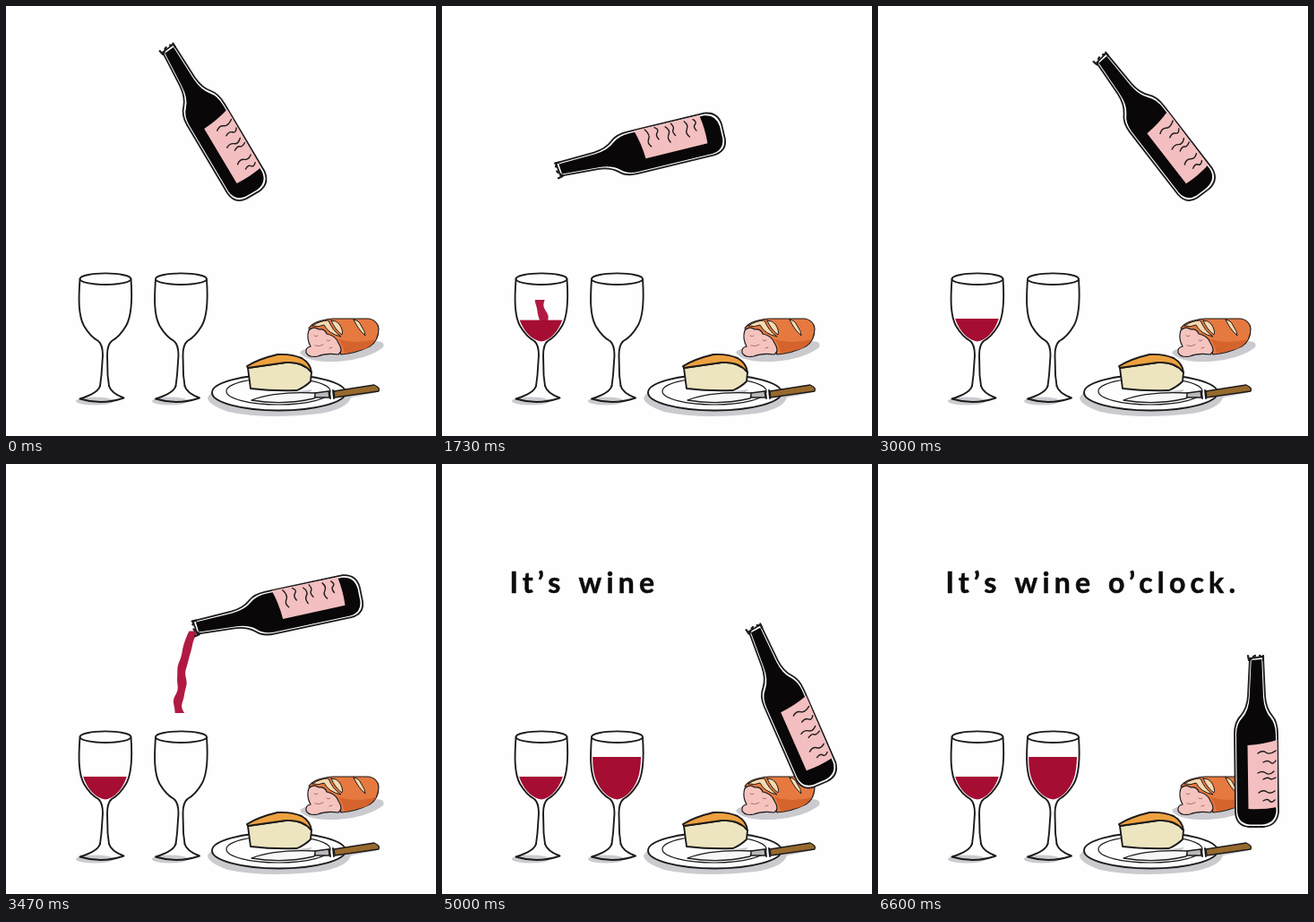
These frames come from a looping animation (480x480 px, 7470 ms). An HTML page:

```html
<!DOCTYPE html>
<html lang="en">
<head>
<meta charset="utf-8">
<title>It’s wine o’clock.</title>
<style>
html, body { margin: 0; width: 100%; height: 100%; overflow: hidden; background: #fefefe; }
svg { display: block; width: 100vw; height: 100vh; }
text { font: 700 32px Lato, "Open Sans", sans-serif; letter-spacing: 5.2px; fill: #0c0c0c; stroke: #0c0c0c; stroke-width: .5; }
.line { fill: none; stroke: #1c1a1b; stroke-width: 1.9; stroke-linecap: round; stroke-linejoin: round; }
.wine { fill: #a50d33; }
.stream { fill: #b01a42; }
.shade { fill: #cbcacf; }
</style>
</head>
<body>
<svg viewBox="0 0 480 480">
  <defs>
    <clipPath id="bowl"><path d="M84.5 305C83 328 83 345 89 356Q97 372 111 374.5Q124 372 132 356C138 345 138 328 137.5 305Z"/></clipPath>
    <g id="glass" class="line">
      <ellipse cx="111" cy="304.7" rx="28.5" ry="6.3"/>
      <path d="M82.5 305C81 326 80.5 345 87 357Q94 369 103 374Q108 378 108 390L106.5 412L105 424M139.5 305C141 326 141 345 134 357Q127 369 118 374Q113 378 113 390L113.5 412L115 424"/>
    </g>
    <path id="foot" class="line" d="M105 424Q103 432 82.5 438.5Q107 446 131.5 437.5Q117 432 115 424"/>
  </defs>

  <g class="shade">
    <ellipse cx="99" cy="441" rx="21" ry="4.5"/>
    <ellipse cx="183" cy="441" rx="20" ry="4.5"/>
    <path d="M328 387Q331 381 345 383L412 374Q424 374 421 381Q405 394 370 397Q335 398 328 387Z"/>
    <path d="M225 437Q228 430 240 430L370 431L414 425Q420 430 411 432L385 437Q381 450 350 455Q290 462 248 453Q225 445 225 437Z"/>
  </g>
  <use href="#foot"/>
  <use href="#foot" x="84.5"/>

  <g id="bread" class="line" style="stroke-width:1.2">
    <path fill="#e6793f" d="M338 360Q343 351 365 349L405 349Q415 351 416 360Q416 374 406 380Q390 388 374 389Q366 364 338 360Z"/>
    <path fill="#d4632c" stroke="none" d="M378 388Q376 377 371 372Q390 378 413 372Q409 379 400 383Z"/>
    <g fill="#f8d9b0" stroke-width="1">
      <path d="M342 357Q351 351 360 351Q364 362 374 369Q360 366 355 356Q349 359 342 357Z"/>
      <path d="M363 351Q369 351 372 355Q377 363 375 367Q367 361 363 351Z"/>
      <path d="M388 350Q394 351 396 356Q401 363 401 368Q393 361 388 350Z"/>
    </g>
    <path fill="#f5c4bf" d="M338 362Q343 357 349 361Q356 360 358 366Q368 368 371 376Q377 385 371 389Q357 387 348 391Q338 393 335 387Q334 381 340 380Q335 371 338 362Z"/>
    <path stroke="#a8655f" stroke-width=".9" d="M344 368q2 2 4 0M345 379q5 2 9-1M358 373q2 2 4 0M361 382l3-1"/>
  </g>

  <g id="plate" class="line">
    <ellipse cx="304.5" cy="431.5" rx="74.5" ry="20" fill="#fefefe"/>
    <ellipse cx="304" cy="430" rx="58" ry="15" stroke-width="1.2"/>
    <path class="shade" stroke="none" d="M284 436L342 428L336 434Z"/>
    <path fill="#ede5c0" d="M270 404L312 398Q332 397 341 409L340 419Q334 425 325 429Q298 430 273 427Z"/>
    <path fill="#eda13f" d="M269 402Q282 394 303 389Q318 388 330 393Q340 399 341 409Q332 397 312 398L270 404Z"/>
    <path fill="#f7f7f7" stroke-width="1.3" d="M274 440Q300 430 346 432L344 438Q310 446 274 440Z"/>
    <path fill="#b9b9bb" d="M345 432L360 430L361 437L345 437Z" stroke-width="1.3"/>
    <path fill="#96692d" stroke-width="1.3" d="M366 430L411 423Q418 426 416 430L367 437Z"/>
    <path d="M361 430L362 438M365 429L366 438"/>
  </g>

  <path id="stream0" class="stream"/>
  <path id="stream1" class="stream"/>
  <g id="glass0"><g clip-path="url(#bowl)"><rect class="wine" x="50" width="120" height="120"/></g><use href="#glass"/></g>
  <g id="glass1"><g clip-path="url(#bowl)"><rect class="wine" x="50" width="120" height="120"/></g><use href="#glass"/></g>

  <g id="bottle" class="line">
    <path fill="#fefefe" stroke-width="1.8" d="M-7-92L8-94L10-50Q11-36 18-28Q24-21 24-8L25 80Q23 95 8 96L-8 96Q-22 95-23 80L-24-8Q-24-21-17-28Q-10-36-9-50Z"/>
    <path fill="#090708" stroke="none" d="M-5.3-90L6.3-91L8-49Q9-34 16-26Q21.8-19 22-7L22.5 79Q21 92 7 93.5L-7 93.5Q-20 92-21 79L-22-7Q-22-19-15-26Q-8-34-7.3-49Z"/>
    <path fill="#f3bfc0" stroke="none" d="M-9.5 5Q8 4 23.6-1L24 74Q8 77-8.5 76Z"/>
    <path stroke-width="1.4" d="M2 14q5-4 9-1t11-2M8 24q5-3 8 0t6-2M2 36q5-3 9 0t9-2M8 43q5-3 7-1t7-1M3 58q5-4 9-1t9-1M8 67q5-3 7 0t6-1"/>
    <path stroke-width="2.2" d="M-8-90l-1-5M-5-92l-2 2M8-90l0-5M-3-94l2-1M4-95l2 1"/>
  </g>

  <text x="75.5" y="144">It’s</text>
  <text x="152.5" y="144">wine</text>
  <text x="257" y="144">o’clock.</text>
</svg>

<script>
const LOOP = 7470, STEP = 200 / 3, LAST = 6600;
const $ = id => document.getElementById(id);
const clamp = (v, lo, hi) => Math.min(hi, Math.max(lo, v));

// time, centre x, centre y, angle
const bottleKeys = [
  [0, 227, 128, -30], [250, 227, 128, -30], [800, 221, 160, -97], [1760, 220.5, 162, -103],
  [2330, 230, 128, -27], [2600, 257, 128, -29], [2970, 305, 131, -34], [3400, 302.5, 163, -98],
  [4200, 302, 164.5, -106], [4400, 302, 164.5, -106], [5000, 385, 269, -23],
  [5250, 422, 309, 0], [LOOP, 422, 309, 0]
];
const clinkKeys = [[0, 0], [5200, 0], [5660, 1], [5800, 1], [6350, 0], [LOOP, 0]];
const wordTimes = [4660, 4860, 5320];
const pours = [
  { x: 111, on: 780, off: 1576, fill: [990, 1780], top: 349, drop: 3, tilt: 5.8 },
  { x: 192, on: 3365, off: 4400, fill: [3570, 4600], top: 327, drop: 5, tilt: -5.8 }
];

function slope(keys, i, c) {
  if (!i || i === keys.length - 1) return 0;
  const [a, b, d] = [keys[i - 1], keys[i], keys[i + 1]];
  return (b[c] - a[c]) * (d[c] - b[c]) <= 0 ? 0 : (d[c] - a[c]) / (d[0] - a[0]);
}

// Smooth curve through the keys, flat at turning points.
function at(keys, t, c = 1) {
  const i = Math.max(0, keys.findIndex(k => k[0] > t) - 1);
  const a = keys[i], b = keys[i + 1], h = b[0] - a[0], p = (t - a[0]) / h, q = 1 - p;
  return q * q * ((1 + 2 * p) * a[c] + p * h * slope(keys, i, c)) +
         p * p * ((1 + 2 * q) * b[c] - q * h * slope(keys, i + 1, c));
}

function streamPath(pour, level, mouth, t) {
  const fall = from => clamp(mouth.y + (t - from) * 0.9, mouth.y, level + 1);
  const top = fall(pour.off), end = fall(pour.on);
  if (end - top < 2) return "";
  const left = [], right = [];
  for (let y = top; ; y = Math.min(y + 3, end)) {
    const d = y - mouth.y, sway = Math.min(1, d / 100), phase = y * 0.165 - t * 0.012 + 2.3;
    const x = pour.x + (mouth.x - pour.x) * Math.exp(-d / 35) + 2.4 * sway * Math.sin(phase);
    const w = 4.8 + 0.8 * sway * Math.sin(phase * 2);
    left.push([x - w, y]);
    right.unshift([x + w, y]);
    if (y >= end) break;
  }
  return "M" + left.concat(right).join("L") + "Z";
}

function draw(t) {
  const [x, y, angle] = [1, 2, 3].map(c => at(bottleKeys, t, c));
  const rad = angle * Math.PI / 180;
  const mouth = { x: x + 95 * Math.sin(rad), y: y - 95 * Math.cos(rad) + 3 };
  $("bottle").setAttribute("transform", `translate(${x} ${y}) rotate(${angle})`);

  const clink = at(clinkKeys, t);
  pours.forEach((pour, i) => {
    const [from, to] = pour.fill;
    const level = 376 + (pour.top - 376) * clamp((t - from) / (to - from), 0, 1);
    const turn = pour.tilt * clink, glass = $("glass" + i), wine = glass.querySelector("rect");
    glass.setAttribute("transform", `translate(${84.5 * i} 0) rotate(${turn} 110 428)`);
    wine.setAttribute("transform", `rotate(${-turn} 110 428)`);
    wine.setAttribute("y", level + pour.drop * clink);
    $("stream" + i).setAttribute("d", streamPath(pour, level, mouth, t));
  });

  document.querySelectorAll("text").forEach((word, i) => {
    word.style.visibility = t >= wordTimes[i] ? "visible" : "hidden";
  });
}

const start = performance.now();
function tick() {
  const t = (performance.now() - start) % LOOP;
  draw(Math.min(LAST, Math.floor((t + 4) / STEP) * STEP));
  requestAnimationFrame(tick);
}
tick();
</script>
</body>
</html>
```
